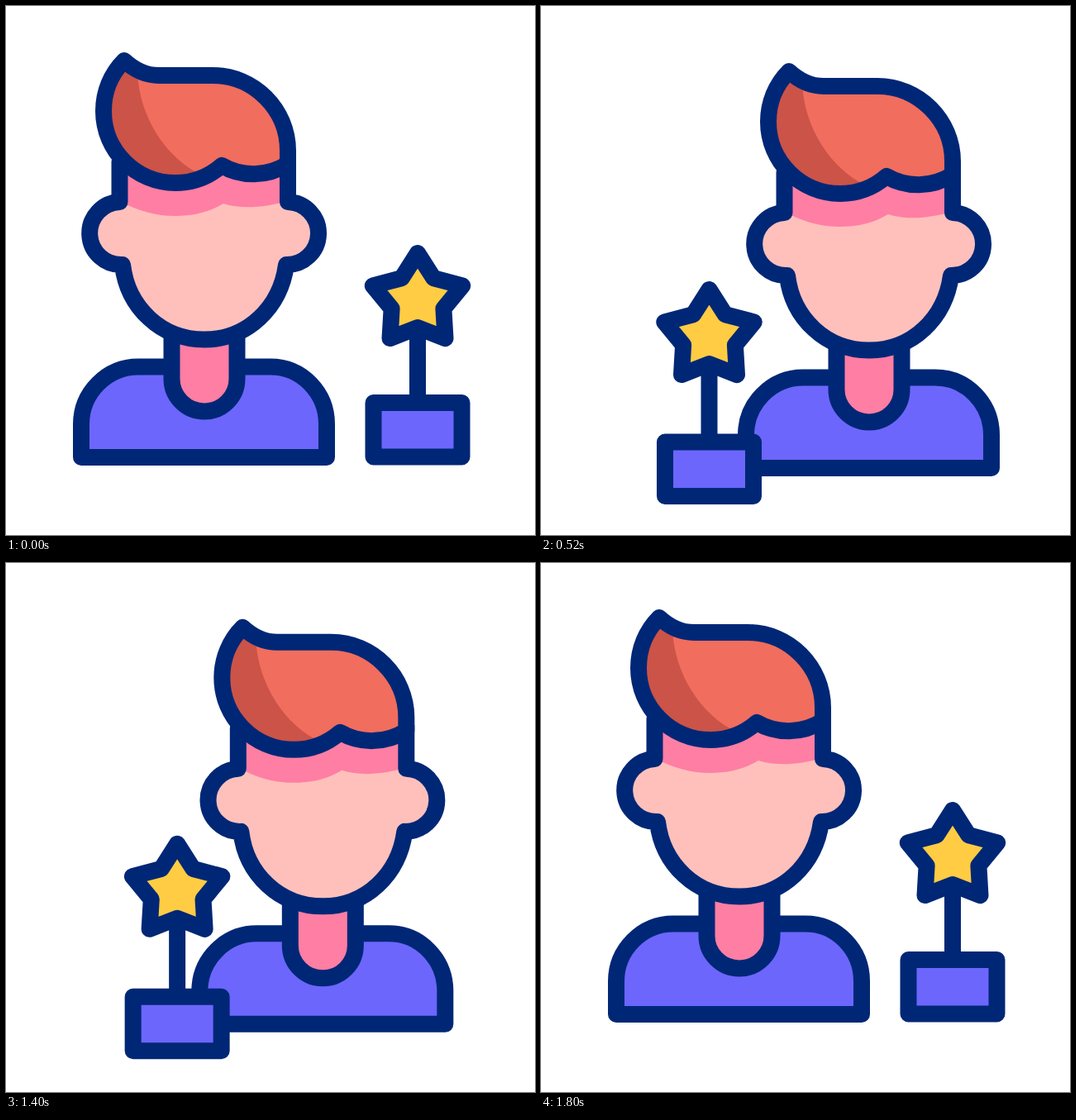
Write an HTML page that moves like this. It is 640x640 px and loops after 2 s.

```html
<!DOCTYPE html>
<html lang="en">
<head>
<meta charset="utf-8">
<title>Award</title>
<style>
  html, body { margin: 0; width: 100%; height: 100%; overflow: hidden; background: #fff; }
  svg { display: block; width: 100%; height: 100%; }
  .ink { stroke: #002776; stroke-width: 20; stroke-linecap: round; stroke-linejoin: round; }
</style>
</head>
<body>
<svg viewBox="0 0 640 640">
  <defs><clipPath id="hairClip"><path id="hairMask"/></clipPath></defs>
  <g id="person">
    <path id="body" class="ink" fill="#6c66fd"/>
    <path id="neck" class="ink" fill="#ff7ea3"/>
    <path id="face" fill="#ffc0bb"/>
    <path id="shade" fill="#ff7ea3"/>
    <path id="faceLine" class="ink" fill="none"/>
    <path id="hair" fill="#f16d5d"/>
    <g clip-path="url(#hairClip)">
      <path id="hairDark" fill="#cc5347" d="M80 20L158 20L159 80C161 135 195 185 236 204L236 240L80 250Z"/>
    </g>
    <path id="hairLine" class="ink" fill="none"/>
  </g>
  <path id="stick" class="ink" fill="none"/>
  <rect id="base" class="ink" fill="#6c66fd" x="444.5" y="480" width="107" height="65.5"/>
  <g id="star">
    <path id="starBody" class="ink" fill="#ffcc43"/>
    <path id="glow" fill="none" stroke="#ff4c89" stroke-width="22" stroke-linecap="round" stroke-linejoin="round" pathLength="100"/>
  </g>
</svg>
<script>
const LOOP = 2000, STEP = 40;
const el = id => document.getElementById(id);
const set = (id, attrs) => {
  for (const name in attrs) el(id).setAttribute(name, attrs[name]);
};

// Each part has a rest pose; the others share its path structure.
const hair = {
  rest: 'M143 66C156 78 170 84 185 84L250 84C300 84 341 125 341 175L341 191C316 207 285 207 261 193C246 206 227 214 205 214C157 214 118 175 118 127C118 104 127 82 143 66Z',
  stretch: 'M146 53.5C157 70 174 83 190 83.5L250 87.5C304 91 341 126 341 178L341 189C310 213 282 206 261 182.5C246 195 236 209 208 208.5C170 207 119 188 119 128C119 100 130 72 146 53.5Z',
  squash: 'M143.5 66C155 80 167 99 184 99L251 99C305 99 342 132 342 180L342 195C318 225 295 215 262 199C248 207 230 226 204 225.5C160 225 119 180 119 127C119 104 127 82 143.5 66Z'
};
const face = {
  rest: 'M137.5 188L137.5 237A37 37 0 0 0 141 313C147 365 188 403.5 240 403.5C292 403.5 332 365 339 313A37 37 0 0 0 341 237L341 185',
  squash: 'M137.5 198L137.5 247A37 37 0 0 0 141 321C147 373 188 410.5 240 410.5C292 410.5 332 373 339 321A37 37 0 0 0 341 247L341 190'
};
const shade = {
  rest: 'M137.5 185L137.5 236C160 248 182 254 204 254C228 254 246 249 263 239C285 246 312 244 341 236L341 185Z',
  squash: 'M137.5 195L137.5 250C160 262 182 267 201 267C228 267 246 250 264 242C285 254 304 263 341 243L341 195Z'
};
const neck = {
  rest: 'M200.5 395L200.5 451A39.5 39.5 0 0 0 279.5 451L279.5 395',
  squash: 'M200.5 395L200.5 444A39.5 39.5 0 0 0 279.5 444L279.5 395'
};
const body = {
  rest: 'M91 546L91 506C91 468 122 436.5 160 436.5L200 436.5L279 436.5L320 436.5C358 436.5 388 468 388 506L388 546Z',
  squash: 'M91 546L91 520C91 486 122 460 160 450L200 439L279 439L320 450C358 460 388 486 388 520L388 546Z'
};

const NUM = /-?\d+(\.\d+)?/g;
const nums = path => path.match(NUM).map(Number);

function blend(part, squash, stretch = 0) {
  const low = nums(part.squash), high = nums(part.stretch || part.rest);
  let i = 0;
  return part.rest.replace(NUM, s => {
    const n = +s, k = i++;
    return +(n + (low[k] - n) * squash + (high[k] - n) * stretch).toFixed(2);
  });
}

function ramp(t, from, to) {
  const s = Math.min(1, Math.max(0, (t - from) / (to - from)));
  return s * s * (3 - 2 * s);
}
const pulse = (t, from, peak, to) => ramp(t, from, peak) - ramp(t, peak, to);

// Counter-clockwise from the top point.
const starPath = 'M' + Array.from({ length: 10 }, (_, i) => {
  const r = i % 2 ? 33 : 57, a = i * Math.PI / 5;
  return `${(-r * Math.sin(a)).toFixed(2)} ${(-r * Math.cos(a)).toFixed(2)}`;
}).join('L') + 'Z';
set('starBody', { d: starPath });
set('glow', { d: starPath });

// Height along the trophy's arc at fraction q of the way across.
const arc = (q, end, c, d) => end * q + q * (1 - q) * (c + d * q);

function drawPerson(t) {
  const go = ramp(t, 80, 520) - ramp(t, 1320, 1760);
  const squash = pulse(t, 520, 800, 1080);
  const stretch = 1.567 * pulse(t, 80, 250, 520);
  const hairPath = blend(hair, squash, stretch);
  const facePath = blend(face, squash);
  set('person', { transform: `translate(${157 * go} ${13 * go})` });
  set('body', { d: blend(body, squash) });
  set('neck', { d: blend(neck, squash) });
  set('face', { d: facePath });
  set('faceLine', { d: facePath });
  set('shade', { d: blend(shade, squash) });
  for (const id of ['hair', 'hairMask', 'hairLine']) set(id, { d: hairPath });
  set('hairDark', { transform: `translate(${4 * stretch} ${8 * squash - 5 * stretch})` });
}

function drawTrophy(t) {
  const q = ramp(t, 70, 466) - ramp(t, 1374, 1770);
  const turn = -360 * (ramp(t, 123, 433) - ramp(t, 1407, 1717));
  const dx = -294.5 * q;
  const baseDy = arc(q, 47.5, -118, -63);
  const starY = 356 + arc(q, 44, -184, -39);
  const head = 100 * ramp(t, 520, 1000), tail = 100 * ramp(t, 735, 1320);
  set('base', { transform: `translate(${dx} ${baseDy})` });
  set('stick', { d: `M${498 + dx} ${starY + 30}V${480 + baseDy}` });
  set('star', { transform: `translate(${498 + dx} ${starY}) rotate(${turn})` });
  set('glow', {
    display: head > tail ? 'inline' : 'none',
    'stroke-dasharray': `${head - tail} 200`,
    'stroke-dashoffset': -tail
  });
}

function draw(ms) {
  const t = Math.floor(ms % LOOP / STEP) * STEP;
  drawPerson(t);
  drawTrophy(t);
}

const start = performance.now();
function tick() {
  draw(performance.now() - start);
  requestAnimationFrame(tick);
}
tick();
</script>
</body>
</html>
```
